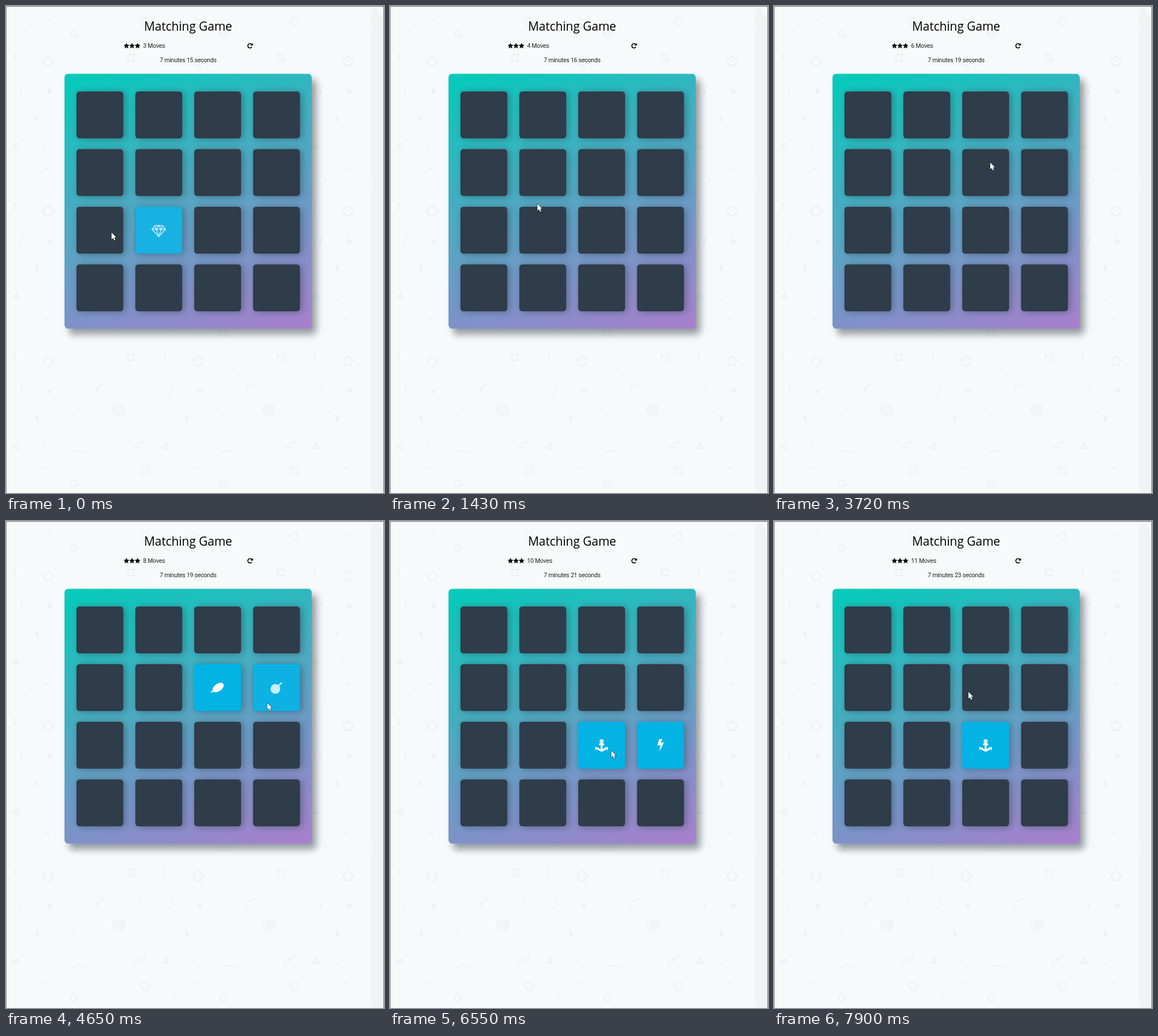
Write an HTML page with a canvas that moves like this. It is 659 by 849 pixels and loops after 8000 ms.

```html
<!DOCTYPE html>
<html lang="en">
<head>
<meta charset="utf-8">
<title>Matching Game</title>
<style>
  html, body { margin: 0; width: 100%; height: 100%; overflow: hidden; background: #f8f9fb; }
  canvas { display: block; }
</style>
</head>
<body>
<canvas id="stage" width="659" height="849"></canvas>
<script>
const W = 659, H = 849, LOOP = 8000, TAU = Math.PI * 2;
const STEP = 143;              // the picture is refreshed at this pace
const FADE = 250, HOLD = 430;  // card fade, time a pair stays open
const TILE = 261.3, MID = 317.5;
const BOARD = { x: 102, y: 118.2, w: 431, h: 444.2, r: 6.5 };
const CARD = { x: 122.8, y: 149, dx: 102.65, dy: 100.5, size: 81.7, r: 5.2 };
const DARK = '#2f3c49', BLUE = '#02b3e4', PALE = '#36b0e0', SHADOW = 'rgba(46,61,73,.5)';
const ctx = document.getElementById('stage').getContext('2d');

// Pointer stops; a stop with an icon clicks the card under it
const stop = (t, x, y, icon) => ({ t, x, y, icon });
const STOPS = [
  stop(-150, 262, 396, 'diamond'), stop(0, 184, 395), stop(140, 184, 395, 'cube'),
  stop(1430, 257, 345), stop(1840, 370, 394, 'anchor'),
  stop(2280, 481, 391), stop(2760, 481, 391, 'bolt'), stop(2900, 478, 441),
  stop(3440, 377, 273), stop(3840, 377, 273, 'leaf'), stop(4380, 458, 315, 'bomb'),
  stop(5720, 414, 352), stop(5980, 455, 385, 'bolt'), stop(6150, 388, 398, 'anchor'),
  stop(7150, 377, 409), stop(7370, 377, 409, 'anchor'), stop(7860, 339, 298)
];
const CLICKS = STOPS.filter(s => s.icon);

const clamp = v => Math.max(0, Math.min(1, v));
const smooth = v => v * v * (3 - 2 * v);

function trace(g, pts, close) {
  g.beginPath();
  for (let i = 0; i < pts.length; i += 2) g.lineTo(pts[i], pts[i + 1]);
  if (close) g.closePath();
}
function line(g, ...pts) { trace(g, pts); g.stroke(); }
function solid(g, ...pts) { trace(g, pts, true); g.fill(); }
function arc(g, x, y, r, a = 0, b = TAU) {
  g.beginPath();
  g.arc(x, y, r, a, b);
  g.stroke();
}
function dot(g, x, y, r) {
  g.beginPath();
  g.arc(x, y, r, 0, TAU);
  g.fill();
}
function dash(g, x, y, length, angle) {
  const dx = Math.cos(angle) * length / 2, dy = Math.sin(angle) * length / 2;
  line(g, x - dx, y - dy, x + dx, y + dy);
}
// Regular polygon, or a star when the inner radius differs
function polygon(g, x, y, r, n, turn, inner = r) {
  g.beginPath();
  for (let i = 0; i < n; i++) {
    const a = turn + i * TAU / n, q = i % 2 ? inner : r;
    g.lineTo(x + q * Math.cos(a), y + q * Math.sin(a));
  }
  g.closePath();
}
function ring(g, ...args) { polygon(g, ...args); g.stroke(); }
function box(g, x, y, w, h, r) {
  g.beginPath();
  g.roundRect(x, y, w, h, r);
  g.fill();
}
function shadow(g, dx, dy, blur) {
  g.shadowColor = SHADOW;
  g.shadowOffsetX = dx;
  g.shadowOffsetY = dy;
  g.shadowBlur = blur;
}

function cardBox(g, col, row) {
  box(g, CARD.x + col * CARD.dx, CARD.y + row * CARD.dy, CARD.size, CARD.size, CARD.r);
}

function spiral(g, x, y, r, turns) {
  g.beginPath();
  for (let k = 0; k <= 1; k += 0.01) {
    const a = k * turns * TAU;
    g.lineTo(x + r * k * Math.cos(a), y + r * k * Math.sin(a));
  }
  g.stroke();
}

function motif(g) {
  ring(g, 118, 48, 6.3, 6, 0.1);
  ring(g, 73.5, 96.5, 9, 5, -1.4);
  ring(g, 218, 90, 7.8, 4, TAU / 8);
  ring(g, 75.5, 148.5, 4, 3, 0);
  ring(g, 17.5, 245.5, 6, 3, 0.65);
  arc(g, 242, 27, 7.2);
  arc(g, 4, 88.5, 12, -0.65, 0.65);
  arc(g, 173, 152, 16, Math.PI, Math.PI * 1.5);
  arc(g, 128, 270, 18, -2.25, -0.9);
  dash(g, 26.8, 146.5, 14.7, -1.26);
  dash(g, 70.5, 22.5, 12.5, 0.5);
  spiral(g, 198, 181, 12, 2.6);
  g.beginPath();
  for (let i = 0; i < 5; i++) g.lineTo(51 + i % 2 * 4 + i * 0.4, 191 + i * 2.6);
  g.stroke();
  g.beginPath();
  for (let i = 0; i < 6; i++) g.lineTo(224 + (i >> 1) * 8.5, 253 - (i + 1 >> 1) * 7);
  g.stroke();
  for (const [x, y] of [[170, 71], [134, 110], [233, 141], [117, 191], [177, 220], [66, 244], [34, 43]]) {
    dot(g, x, y, 1.6);
  }
}

function paintPage(g) {
  g.fillStyle = '#f8f9fb';
  g.fillRect(0, 0, W, H);
  g.strokeStyle = g.fillStyle = '#e9ebed';
  g.lineWidth = 1.4;
  for (let i = 0; i < 15; i++) {
    g.save();
    g.translate(i % 3 * TILE, (Math.floor(i / 3) - 1) * TILE);
    motif(g);
    g.restore();
  }
  g.fillStyle = '#f8f9fa';
  g.fillRect(637.5, 0, 22, H);
  g.fillStyle = '#f2f4f4';
  box(g, 637.5, 4, 18.5, H, [0, 18, 0, 0]);
  g.fillStyle = '#858687';
  g.fillRect(0, 0, W, 1.3);
  g.fillRect(0, 0, 1, H);
  g.fillRect(657.8, 0, 1.2, H);
}

function paintBoard(g) {
  const { x, y, w, h, r } = BOARD, angle = 160 * Math.PI / 180;
  const sin = Math.sin(angle), cos = -Math.cos(angle);
  const half = (w * sin + h * cos) / 2, cx = x + w / 2, cy = y + h / 2;
  const fill = g.createLinearGradient(cx - sin * half, cy - cos * half, cx + sin * half, cy + cos * half);
  fill.addColorStop(0, '#02ccba');
  fill.addColorStop(1, '#aa7ecd');
  g.save();
  shadow(g, 8, 10, 13);
  g.fillStyle = fill;
  box(g, x, y, w, h, r);
  shadow(g, 3.3, 1.3, 13);
  g.fillStyle = DARK;
  for (let i = 0; i < 16; i++) cardBox(g, i % 4, i >> 2);
  g.restore();
}

function paintHeader(g) {
  g.fillStyle = g.strokeStyle = '#000';
  g.textAlign = 'center';
  g.font = '20.9px "Open Sans", sans-serif';
  g.fillText('Matching Game', MID, 42.6);
  for (let i = 0; i < 3; i++) {
    polygon(g, 210 + i * 9.7, 69.6, 5.3, 10, -TAU / 4, 2.5);
    g.fill();
  }
  g.lineWidth = 1.7;
  arc(g, 425.4, 69.4, 3.8, 0.6, TAU - 0.75);
  solid(g, 430.4, 64.6, 430.4, 68.9, 426.1, 68.9);
}

function paintScene() {
  const layer = document.createElement('canvas');
  layer.width = W;
  layer.height = H;
  const g = layer.getContext('2d');
  paintPage(g);
  paintBoard(g);
  paintHeader(g);
  return layer;
}

// Icons are drawn around the middle of a card
const ICONS = {
  diamond(g) {
    g.lineWidth = 2;
    g.lineJoin = 'round';
    line(g, -11.8, -2, 11.8, -2);
    for (const s of [-1, 1]) {
      line(g, 0, -8.6, s * 7, -8.6, s * 11.8, -2, 0, 10.4, s * 4.4, -2, s * 7, -8.6);
      line(g, s * 4.4, -2, 0, -8.6);
    }
  },
  anchor(g) {
    g.lineWidth = 2.3;
    arc(g, 0, -7.5, 2.3);
    g.lineWidth = 3.3;
    line(g, 0, -5.2, 0, 9);
    line(g, -4.6, -2, 4.6, -2);
    arc(g, 0, -0.6, 9, 0.5, Math.PI - 0.5);
    for (const s of [-1, 1]) solid(g, s * 11, 2, s * 11, 8.2, s * 5, 5.6);
    dot(g, 0, 9, 2);
  },
  bolt(g) {
    solid(g, -2.5, -11, 3, -11, 0.5, -4.5, 6, -5.5, -2, 11, 0, -0.8, -5.5, 0.4);
  },
  leaf(g) {
    g.rotate(-0.6);
    g.beginPath();
    g.ellipse(1, 0, 11, 6.5, 0, 0, TAU);
    g.fill();
    g.lineWidth = 2;
    line(g, -14, 0, -9, 0);
  },
  cube(g) {
    g.lineWidth = 2;
    ring(g, 0, 0, 11, 6, TAU / 4);
    for (let i = 0; i < 3; i++) {
      const a = TAU / 4 + i * TAU / 3;
      line(g, 0, 0, 11 * Math.cos(a), 11 * Math.sin(a));
    }
  },
  bomb(g) {
    dot(g, -2, 2, 8.5);
    g.lineWidth = 2.5;
    line(g, 3, -3, 9, -9);
  }
};

// Cards close in pairs, a moment after the second one was clicked
function drawCard(t, click, i) {
  const second = CLICKS[i | 1];
  const closing = second ? clamp((t - second.t - HOLD) / FADE) : 0;
  const p = Math.min(clamp((t - click.t) / FADE), 1 - closing);
  if (p <= 0) return;
  const col = Math.floor((click.x - CARD.x) / CARD.dx);
  const row = Math.floor((click.y - CARD.y) / CARD.dy);
  ctx.save();
  ctx.globalAlpha = Math.min(1, p * 2);
  ctx.fillStyle = PALE;
  cardBox(ctx, col, row);
  ctx.globalAlpha = p;
  ctx.fillStyle = BLUE;
  cardBox(ctx, col, row);
  ctx.fillStyle = ctx.strokeStyle = '#fff';
  ctx.translate(CARD.x + col * CARD.dx + CARD.size / 2, CARD.y + row * CARD.dy + CARD.size / 2 + 0.5);
  ICONS[click.icon](ctx);
  ctx.restore();
}

function drawPointer(t) {
  const next = Math.max(1, STOPS.findIndex(s => s.t > t));
  const done = t >= STOPS.at(-1).t;
  const b = done ? STOPS.at(-1) : STOPS[next], a = done ? b : STOPS[next - 1];
  const k = done ? 0 : smooth((t - a.t) / (b.t - a.t));
  ctx.save();
  ctx.translate(a.x + (b.x - a.x) * k, a.y + (b.y - a.y) * k);
  trace(ctx, [0, 0, 0, 11.8, 2.7, 9.3, 4.6, 13.6, 6.6, 12.7, 4.7, 8.5, 8.2, 8.3], true);
  ctx.lineWidth = 1.1;
  ctx.strokeStyle = '#1d2329';
  ctx.stroke();
  ctx.fillStyle = '#fff';
  ctx.fill();
  ctx.restore();
}

function drawStatus(t) {
  const moves = 2 + CLICKS.filter(c => c.t <= t).length;
  const seconds = 16 + Math.floor((t - 710) / 1000);
  ctx.fillStyle = '#222';
  ctx.font = '10.6px Roboto, sans-serif';
  ctx.letterSpacing = '-0.25px';
  ctx.textAlign = 'left';
  ctx.fillText(`${moves} Moves`, 239, 73.2);
  ctx.textAlign = 'center';
  ctx.fillText(`7 minutes ${seconds} seconds`, MID, 97.8);
}

const scene = paintScene();

function frame(now) {
  const t = Math.floor(now % LOOP / STEP) * STEP;
  ctx.drawImage(scene, 0, 0);
  drawStatus(t);
  CLICKS.forEach((click, i) => drawCard(t, click, i));
  drawPointer(t);
  requestAnimationFrame(frame);
}
requestAnimationFrame(frame);
</script>
</body>
</html>
```
